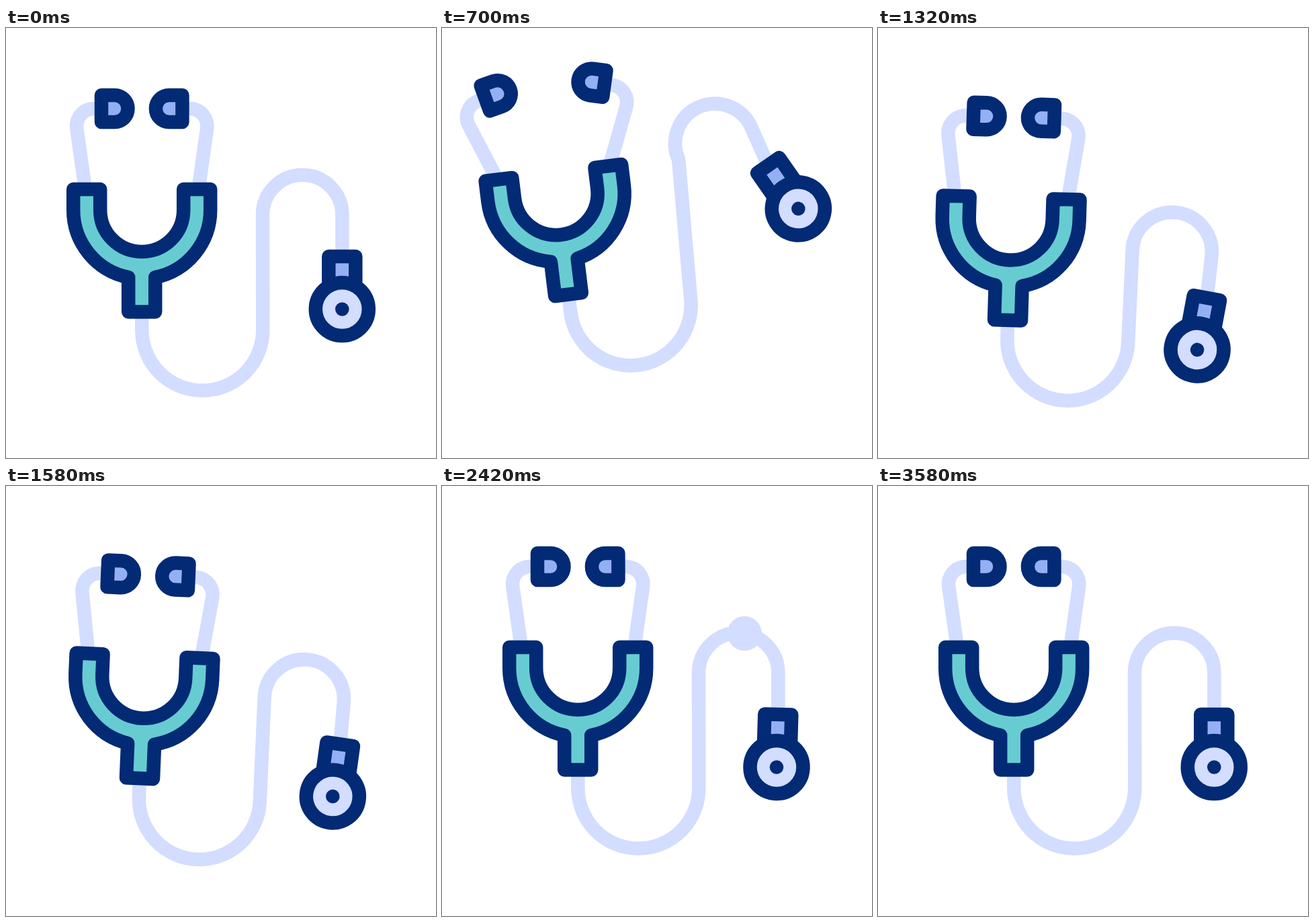
Recreate the animation shown at these times as an HTML page with a canvas. Size 640x640 px, loop 3.6 s.

```html
<!DOCTYPE html>
<html lang="en">
<head>
<meta charset="utf-8">
<title>Stethoscope</title>
<style>
  html, body { margin: 0; width: 100%; height: 100%; overflow: hidden; background: #fff; }
  canvas { display: block; width: 100vw; height: 100vh; }
</style>
</head>
<body>
<canvas id="stage" width="640" height="640"></canvas>
<script>
const ctx = document.getElementById('stage').getContext('2d');
const LOOP = 3600;
const NAVY = '#032a75', LIGHT = '#d2ddff', TEAL = '#67ccd1', BLUE = '#94b0f5';
const AXIS = 202.2;

const rad = deg => deg * Math.PI / 180;

// Cubic bezier easing with end handles (a, 0) and (b, 1)
const bezier = (a, b) => u => {
  let lo = 0, hi = 1;
  for (let i = 0; i < 24; i++) {
    const s = (lo + hi) / 2;
    const x = 3 * a * s * (1 - s) ** 2 + 3 * b * s * s * (1 - s) + s ** 3;
    if (x < u) lo = s; else hi = s;
  }
  return lo * lo * (3 - 2 * lo);
};
const smooth = u => u * u * (3 - 2 * u);
const launch = bezier(0.33, 0.1);
const drop = bezier(0.95, 0.65);
const flow = bezier(0.4, 0.1);

// Each key: [time, values, easing used to arrive there]
function track(keys, t) {
  if (t <= keys[0][0]) return keys[0][1];
  for (let i = 1; i < keys.length; i++) {
    const [t0, from] = keys[i - 1], [t1, to, ease = smooth] = keys[i];
    if (t < t1) {
      const p = ease((t - t0) / (t1 - t0));
      return from.map((v, k) => v + (to[k] - v) * p);
    }
  }
  return keys[keys.length - 1][1];
}

// x, y, angle of the whole instrument
const BODY = [
  [465, [0, 0, 0]],
  [760, [-13.2, -26.5, -7.1], launch],
  [1470, [-8, 27.6, 5.2], drop],
  [1680, [0, 0, 0]]
];
// x, y, angle of the upper tube bend
const ARM = [
  [465, [0, 0, 0]],
  [760, [7.6, -35.5, -17.3], launch],
  [1420, [2, 39, 7.4], drop],
  [1690, [0, 0, 0]]
];
const CHEST = [
  [465, [0]],
  [760, [-11.2], launch],
  [1420, [6], drop],
  [1920, [-6.6]],
  [2300, [2.3]],
  [2700, [-0.5]],
  [3150, [0.2]],
  [3570, [0]]
];
const EARS = [
  [465, [0]],
  [760, [1], launch],
  [1300, [0], drop],
  [3020, [0]],
  [3185, [1]],
  [3540, [0]]
];

function turned(x, y, deg, draw) {
  ctx.save();
  ctx.translate(x, y);
  ctx.rotate(rad(deg));
  draw();
  ctx.restore();
}

function paint(fill, stroke) {
  if (fill) { ctx.fillStyle = fill; ctx.fill(); }
  if (stroke) { ctx.strokeStyle = stroke; ctx.stroke(); }
}

function disc(x, y, r, fill, stroke) {
  ctx.beginPath();
  ctx.arc(x, y, r, 0, 2 * Math.PI);
  paint(fill, stroke);
}

// Left ear piece with the origin at its hinge
function ear(deg) {
  turned(118, 240, deg, () => {
    ctx.translate(-118, -240);
    ctx.beginPath();
    ctx.moveTo(118, 240);
    ctx.arc(131, 146, 26, rad(172), rad(270));
    ctx.lineTo(142, 120);
    paint(null, LIGHT);
    ctx.beginPath();
    ctx.moveTo(142, 100);
    ctx.arc(161.5, 120, 20, rad(-90), rad(90));
    ctx.lineTo(142, 140);
    ctx.closePath();
    paint(BLUE, NAVY);
  });
}

function ears(open) {
  ear(-13 * open);
  ctx.save();
  ctx.translate(2 * AXIS, 0);
  ctx.scale(-1, 1);
  ear(-15 * open);
  ctx.restore();
}

function yoke() {
  const x = AXIS, y = 271, spread = Math.asin(20 / 102);
  ctx.beginPath();
  ctx.moveTo(x - 102, 240);
  ctx.lineTo(x - 62, 240);
  ctx.arc(x, y, 62, Math.PI, 0, true);
  ctx.lineTo(x + 62, 240);
  ctx.lineTo(x + 102, 240);
  ctx.arc(x, y, 102, 0, Math.PI / 2 - spread);
  ctx.lineTo(x + 20, 422.5);
  ctx.lineTo(x - 20, 422.5);
  ctx.arc(x, y, 102, Math.PI / 2 + spread, Math.PI);
  ctx.closePath();
  paint(TEAL, NAVY);
}

// Chest piece hanging from the origin
function chestPiece() {
  ctx.beginPath();
  ctx.rect(-20, 0, 40, 45);
  paint(BLUE, NAVY);
  disc(0, 78.5, 39.5, LIGHT, NAVY);
  disc(0, 78.5, 10.3, NAVY);
}

function onArm([dx, dy, deg], draw) {
  turned(382 + dx, 278 + dy, deg, draw);
}

function tube(arm) {
  ctx.beginPath();
  ctx.moveTo(AXIS, 425);
  ctx.arc(292.3, 449.5, 90, Math.PI, 0, true);
  onArm(arm, () => {
    ctx.arc(59.2, 0, 59.2, Math.PI, 2 * Math.PI);
    ctx.lineTo(118.4, 66);
  });
  paint(null, LIGHT);
}

// Point at distance s along the tube, from the chest piece to the yoke
function alongTube(s) {
  const bend = 59.2 * Math.PI, loop = 90 * Math.PI;
  if (s < 140) return [500.3, 418 - s];
  s -= 140;
  if (s < bend) return [441.2 + 59.2 * Math.cos(s / 59.2), 278 - 59.2 * Math.sin(s / 59.2)];
  s -= bend;
  if (s < 171.5) return [382, 278 + s];
  s -= 171.5;
  if (s < loop) return [292.3 + 90 * Math.cos(s / 90), 449.5 + 90 * Math.sin(s / 90)];
  return [AXIS, 449.5 - (s - loop)];
}

function pulse(t) {
  const u = (t - 2058) / 1510;
  if (u > 0 && u < 1) disc(...alongTube(830 * flow(u)), 25.7, LIGHT);
}

function render(t) {
  const [x, y, deg] = track(BODY, t);
  const arm = track(ARM, t);
  const [swing] = track(CHEST, t);
  const [open] = track(EARS, t);
  ctx.fillStyle = '#fff';
  ctx.fillRect(0, 0, 640, 640);
  ctx.lineWidth = 20.5;
  ctx.lineJoin = 'round';
  turned(202 + x, 433 + y, deg, () => {
    ctx.translate(-202, -433);
    tube(arm);
    pulse(t);
    ears(open);
    yoke();
    onArm(arm, () => turned(118.3, 62, swing, chestPiece));
  });
}

const start = performance.now();
function frame() {
  render((performance.now() - start) % LOOP);
  requestAnimationFrame(frame);
}
frame();
</script>
</body>
</html>
```
